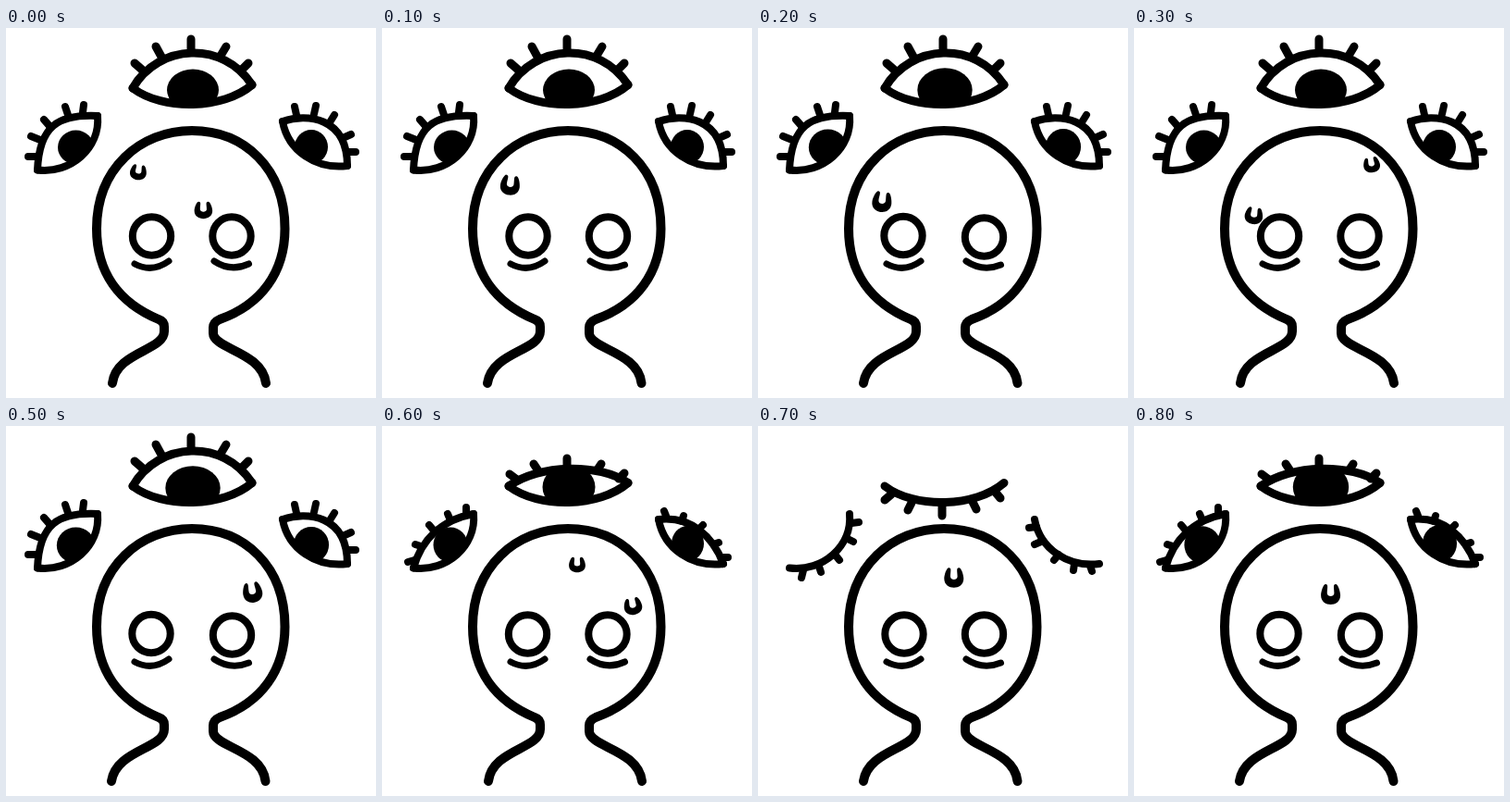
An HTML page with a canvas for the animation above (900 ms loop, 400 by 400 pixels).

```html
<!DOCTYPE html>
<html lang="en">
<head>
<meta charset="utf-8">
<title>Blinking eyes</title>
<style>
  html, body { margin: 0; width: 100%; height: 100%; overflow: hidden; background: #fff; }
  canvas { display: block; width: 100vw; height: 100vh; }
</style>
</head>
<body>
<canvas width="400" height="400"></canvas>
<script>
const ctx = document.querySelector('canvas').getContext('2d');
const STEP = 100, STEPS = 9;
const OPEN = 0, HALF = 1, CLOSED = 2;

// Lids are cubic curves between two corners; arrays with several poses are indexed by pose.
const eyes = [
  {
    width: 9, corners: ['137,65', '266,61.5'], lower: ['170,90', '235,88'],
    upper: ['165,16.5 235,13.5', '170,41 235,40'],
    pupil: [[202, 67, 28, 22.5], [202, 66, 28.5, 24]],
    lashes: [
      'M139,38L147,45M162,20L168,31M200,12V25M238,20L232,30M262,38L255,45',
      'M138,52L146,58M164,41L168,47M200,35V44M237,41L233,47M262,51L256,57',
      'M137,80L144,74M162,91L166,83M199,97V85M236,90L232,82M262,78L257,72'
    ]
  },
  {
    width: 8, corners: ['34,153.5', '99,95'], lower: ['70,158', '102,130'],
    upper: ['36,106 56,93', '42,125 62,102'],
    pupil: [[75.5, 129, 19.5, 18.5], [74, 128.5, 18.5, 19]],
    lashes: [
      'M24,139H32M27,117L37,121M41,99L48,107M64,85L67,94M84,83L83,91',
      'M28,147L35,145M36,128L42,130M51,107L56,113M71,95L74,102M91,88V93',
      'M47,164L49,156M68,158L66,152M88,145L84,140M103,125L97,122M109,104L101,105'
    ]
  },
  {
    width: 8, corners: ['299,101', '369,149'], lower: ['305,133', '335,153'],
    upper: ['325,92 369,96', '335,97 358,120'],
    pupil: [[330, 128.5, 18, 18.5], [330.5, 127, 17.5, 19]],
    lashes: [
      'M312,85L314,94M335,84L333,93M355,94L350,102M373,115L364,119M378,134H369',
      'M305,92L307,97M326,97L324,103M347,107L342,112M364,126L358,128M374,142H369',
      'M293,110L301,109M299,128L306,125M320,145L325,139M341,156L342,149M361,157L359,151'
    ]
  }
];

const head = 'C119,350 171,349 171,328L171,323Q171,317 165,315' +
  'C122,297 98,264 98,217C98,152 145,111 201,111C258,111 301.5,152 301.5,217' +
  'C301.5,264 276,299 231,315Q224,318 224,324L224,330C224,347 277,350 ';

// The line drawing trembles through three slightly different poses.
const wobble = [
  { feet: ['115,384', '281,384'], left: [157.5, 225], right: [244, 225], bag: 255, pupil: 1 },
  { feet: ['114,384', '280.5,384'], left: [158, 225], right: [244.5, 225], bag: 256, pupil: 1 },
  { feet: ['114,384', '280.5,384'], left: [157, 224.5], right: [244.5, 226], bag: 256, pupil: 1.06 }
];

const dropShape = new Path2D('M-5.5,-11C-8,-11 -10.5,-3 -10.5,1C-10.5,8 -5,11 0,11' +
  'S10.5,8 10.5,1C10.5,-3 8,-11 5.5,-11C2,-11 4,-6 3.8,-1C3.5,3 -3.5,3 -3.8,-1C-4,-6 -2,-11 -5.5,-11Z');
const drops = [
  { born: 0, x: 143, y: 156, drift: -4.5, tilt: 0.15 },
  { born: 3, x: 257, y: 148, drift: 4.8, tilt: -0.18 },
  { born: 6, x: 211, y: 150, drift: 0.8, tilt: 0 }
];
const dropFall = [0, 14, 32, 47];
const dropSize = [[0.85, 0.75], [1, 0.97], [1, 1], [0.93, 0.83]];

function line(path, width) {
  ctx.lineWidth = width;
  ctx.stroke(new Path2D(path));
}

function drawEye(eye, pose, pupilScale) {
  const [start, end] = eye.corners;
  const [near, far] = eye.lower;
  if (pose !== CLOSED) {
    const upper = `M${start}C${eye.upper[pose]} ${end}`;
    const [x, y, rx, ry] = eye.pupil[pose];
    ctx.save();
    ctx.clip(new Path2D(`${upper}C${far} ${near} ${start}Z`));
    ctx.beginPath();
    ctx.ellipse(x, y, rx * pupilScale, ry * pupilScale, 0, 0, 7);
    ctx.fill();
    ctx.restore();
    line(upper, eye.width);
  }
  line(`M${start}C${near} ${far} ${end}`, eye.width);
  line(eye.lashes[pose], eye.width);
}

function drawPerson({ feet, left, right, bag }) {
  line('M' + feet[0] + head + feet[1], 10);
  for (const [x, y] of [left, right]) {
    ctx.lineWidth = 8;
    ctx.beginPath();
    ctx.arc(x, y, 20.7, 0, 7);
    ctx.stroke();
  }
  line(`M139,255Q158,265 176,252M225,252Q243,264 262.5,${bag}`, 7);
}

function drawDrop(drop, step) {
  const age = (step - drop.born + STEPS) % STEPS;
  if (age >= dropFall.length) return;
  ctx.save();
  ctx.translate(drop.x + drop.drift * age, drop.y + dropFall[age]);
  ctx.rotate(drop.tilt);
  ctx.scale(...dropSize[age]);
  ctx.fill(dropShape);
  ctx.restore();
}

function draw(now) {
  const step = Math.floor(now / STEP) % STEPS;
  const pose = step === 7 ? CLOSED : step === 6 || step === 8 ? HALF : OPEN;
  const tremble = wobble[step % wobble.length];
  ctx.fillStyle = '#fff';
  ctx.fillRect(0, 0, 400, 400);
  ctx.fillStyle = ctx.strokeStyle = '#000';
  ctx.lineCap = ctx.lineJoin = 'round';
  drawPerson(tremble);
  eyes.forEach(eye => drawEye(eye, pose, tremble.pupil));
  drops.forEach(drop => drawDrop(drop, step));
}

const startTime = performance.now();
function tick() {
  draw(performance.now() - startTime);
  requestAnimationFrame(tick);
}
tick();
</script>
</body>
</html>
```
